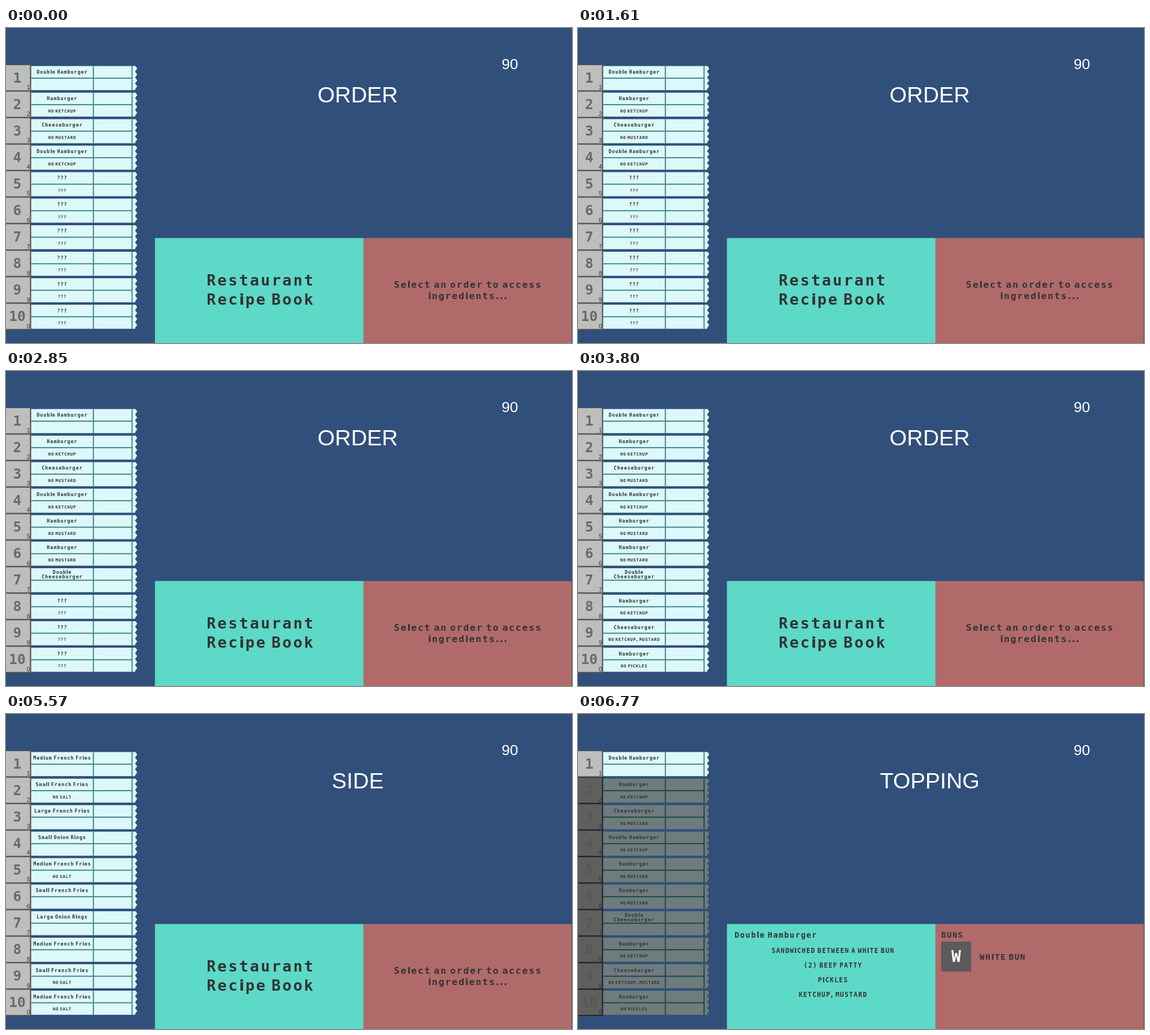
Animation of 1002x559 px, one loop 8 s. Source, as an HTML page:

```html
<!DOCTYPE html>
<html lang="en">
<head>
<meta charset="utf-8">
<title>Restaurant orders</title>
<style>
html, body { margin: 0; width: 100%; height: 100%; overflow: hidden; background: #314f7b; }
svg { display: block; width: 100vw; height: 100vh; }
text { font-family: "DejaVu Sans Mono", monospace; font-weight: bold; fill: #333; letter-spacing: .108em; word-spacing: -.41em; text-anchor: middle; }
.narrow { font-family: "DejaVu Sans", sans-serif; letter-spacing: .06em; }
.plain { font: 39.4px "Liberation Sans", sans-serif; fill: #fff; letter-spacing: 0; }
.key { font: 10px "Liberation Sans", sans-serif; letter-spacing: 0; }
.start { text-anchor: start; }
.number { font-size: 24.5px; fill: #6a6a69; letter-spacing: 0; }
.edge { fill: #585858; }
.cell { fill: #bebfbd; }
.paper { fill: #dcf8fa; }
.rule { fill: #438984; }
.dim .number { fill: #575757; }
.dim .edge { fill: #262626; }
.dim .cell { fill: #5f5f5e; }
.dim .paper { fill: #6e7c7d; }
.dim .rule { fill: #214542; }
</style>
</head>
<body>
<svg viewBox="0 0 1002 559" preserveAspectRatio="none">
  <rect width="1002" height="559" fill="#314f7b"/>
  <g id="rows"></g>
  <text id="title" class="plain" x="622.7" y="132.3"></text>
  <text class="plain" x="892" y="72.8" style="font-size:26.2px">90</text>
  <rect x="263.7" y="372.7" width="369.3" height="187" fill="#5dd9c7"/>
  <rect x="632.7" y="372.7" width="368.5" height="187" fill="#b16a6a"/>
  <g id="idle"></g>
  <g id="recipe"></g>
  <g id="cursor">
    <circle id="ring" r="7" fill="none" stroke="#fff" stroke-opacity=".6"/>
    <path d="M.5 .5V15.5L4 12.2L6.4 17.8L8.8 16.8L6.4 11.3H11.2Z" fill="#fff" stroke="#000" stroke-width=".8"/>
  </g>
</svg>
<script>
const DURATION = 8000, PITCH = 47.05, STEP = 76.7;
const $ = id => document.getElementById(id);

const orders = [
  "Double Hamburger", "Hamburger|NO KETCHUP", "Cheeseburger|NO MUSTARD", "Double Hamburger|NO KETCHUP",
  "Hamburger|NO MUSTARD", "Hamburger|NO MUSTARD", "Double/Cheeseburger", "Hamburger|NO KETCHUP",
  "Cheeseburger|NO KETCHUP, MUSTARD", "Hamburger|NO PICKLES"];
const drinks = [
  "Small Root Beer|NO ICE", "Medium Diet Cola", "Small Pixie|NO ICE", "Medium Diet Cola", "Large Root Beer",
  "Small Pixie", "NO DRINK", "Small Pixie|NO ICE", "Small Root Beer|NO ICE", "Medium Pixie"];
const sides = [
  "Medium French Fries", "Small French Fries|NO SALT", "Large French Fries", "Small Onion Rings",
  "Medium French Fries|NO SALT", "Small French Fries", "Large Onion Rings", "Medium French Fries",
  "Small French Fries|NO SALT", "Medium French Fries|NO SALT"];
const revealAt = [0, 0, 0, 0, 2470, 2620, 2850, 3170, 3400, 3800];

// Thin letters take a narrower face than the monospaced rest.
const letters = s => s.replace(/[ilI.,]+/g, '<tspan class="narrow">$&</tspan>');
const label = (s, x, y, size, cls = "") =>
  `<text class="${cls}" x="${x}" y="${y}" style="font-size:${size}px">${letters(s)}</text>`;
const box = (cls, x, y, w, h) => `<rect class="${cls}" x="${x}" y="${y}" width="${w}" height="${h}"/>`;

function ticketPath() {
  let d = "M44.6 67.6H229.5";
  for (let k = 0; k < 4; k++) d += `L232.3 ${72 + 10.5 * k}L228.5 ${77.3 + 10.5 * k}`;
  return d + "L229 110.3H44.6Z";
}

$("rows").innerHTML = orders.map((_, i) => `<g transform="translate(0 ${i * PITCH})">` +
  box("edge", 0, 65, 44.6, 47.6) + box("cell", 0, 66, 42.3, 44.5) +
  `<path class="paper" d="${ticketPath()}"/>` +
  box("rule", 44.6, 88, 178.4, 2) + box("rule", 153.7, 67.6, 2, 42.7) + box("rule", 222.2, 67.6, 2, 42.7) +
  `<text class="number" x="20" y="97">${i + 1}</text>` +
  `<text class="key" x="39.5" y="109.3">${(i + 1) % 10}</text><g></g></g>`).join("");
const rows = [...$("rows").children];

$("idle").innerHTML =
  label("Restaurant", 451, 457, 27) + label("Recipe Book", 451, 491, 27) +
  label("Select an order to access", 818, 460.5, 16.6) + label("ingredients...", 818, 480.5, 16.6);

$("recipe").innerHTML =
  label("Double Hamburger", 277, 397, 13.8, "start") +
  ["SANDWICHED BETWEEN A WHITE BUN", "(2) BEEF PATTY", "PICKLES", "KETCHUP, MUSTARD"]
    .map((s, i) => label(s, 451.5, 424.4 + 26 * i, 11.4)).join("") +
  label("BUNS", 643, 397, 14, "start") +
  '<rect x="643" y="404" width="53" height="53" fill="#5b5b5b"/>' +
  '<text x="671" y="440" style="font-size:28px;fill:#fff">W</text>' +
  label("WHITE BUN", 711, 435.5, 14.4, "start");

function setRow(row, content, dim) {
  const key = content + dim;
  if (row.dataset.key === key) return;
  row.dataset.key = key;
  row.classList.toggle("dim", dim);
  const [item, note = ""] = content.split("|");
  const lines = item.split("/");
  const top = lines.length > 1 ? 77.7 : 81.2;
  row.lastChild.innerHTML =
    lines.map((s, i) => label(s, 99.5, top + 8 * i, 8.5)).join("") + label(note, 99.5, 102.7, 7.4);
}

function cursorAt(t) {
  if (t < 1380) {
    const p = Math.min(6, Math.floor((t - 380) / STEP)) / 6;
    const rest = (1 - p) ** 2;
    return [723 + 183 * rest, 287 + 233 * rest];
  }
  const p = ((Math.floor((t - 1380) / STEP) + 1) / 3) ** 1.5;
  return [723 + 237 * p, 287 + 43 * p];
}

const show = (id, on) => $(id).setAttribute("display", on ? "inline" : "none");

function update(t) {
  const screen = t < 5270 ? "ORDER" : t < 5570 ? "DRINK" : t < 5920 ? "SIDE" : "TOPPING";
  const list = { DRINK: drinks, SIDE: sides }[screen] || orders;
  const selected = t >= 6770;
  if ($("title").textContent !== screen) $("title").textContent = screen;
  rows.forEach((row, i) => {
    const content = t < revealAt[i] ? "???|???" : list[i];
    setRow(row, content, selected ? i > 0 : content === "NO DRINK");
  });
  show("idle", !selected);
  show("recipe", selected);

  const moving = t >= 380 && t < 1610;
  show("cursor", moving);
  show("ring", t >= 990 && t < 1070);
  if (moving) $("cursor").setAttribute("transform", `translate(${cursorAt(t)})`);
}

const begin = performance.now();
function tick() {
  update((performance.now() - begin) % DURATION);
  requestAnimationFrame(tick);
}
tick();
</script>
</body>
</html>
```
